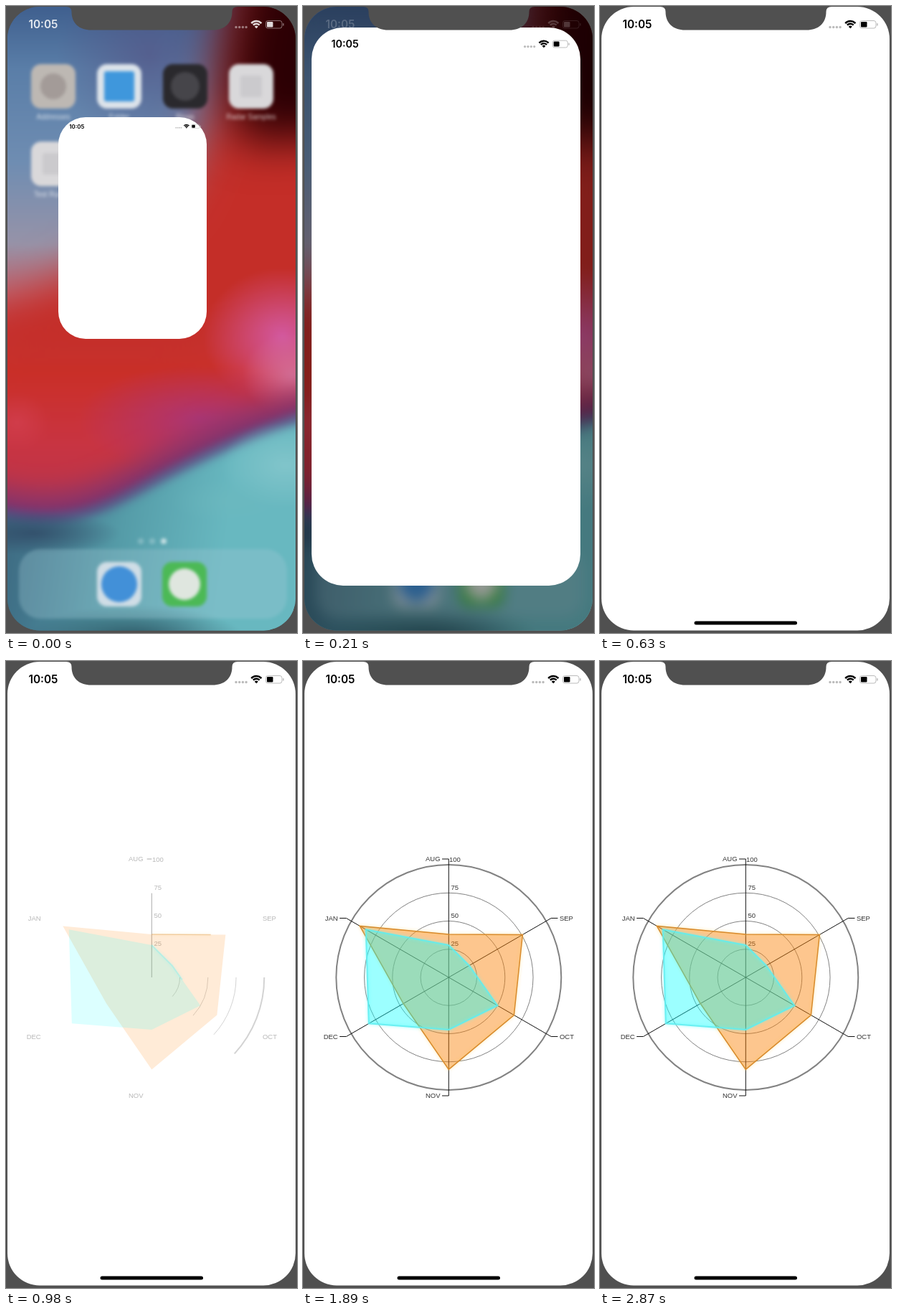
These frames come from a looping animation (406x874 px, 3.08 s). An HTML page with a canvas:

```html
<!DOCTYPE html>
<html lang="en">
<head>
<meta charset="utf-8">
<title>Radar chart launch</title>
<style>
html, body { margin: 0; width: 100%; height: 100%; overflow: hidden; background: #505050; }
canvas { display: block; }
</style>
</head>
<body>
<canvas id="stage" width="406" height="874"></canvas>
<script>
const W = 406, H = 874, LOOP = 3080, STEP = 70;
const CX = 203.3, CY = 441, RING = 157, SPOKE = 165;
const ctx = document.getElementById('stage').getContext('2d');
const clamp = v => Math.max(0, Math.min(1, v));

function box(c, x, y, w, h, r, fill) {
  c.beginPath();
  c.roundRect(x, y, w, h, r);
  if (fill) { c.fillStyle = fill; c.fill(); }
}

function disc(c, x, y, r, fill) {
  c.beginPath();
  c.arc(x, y, r, 0, 7);
  c.fillStyle = fill;
  c.fill();
}

function poly(c, pts) {
  c.beginPath();
  pts.forEach(p => c.lineTo(...p));
  c.closePath();
}

// ---------- home screen, painted once ----------
function ramp(c, x, y, stops) {
  const g = c.createLinearGradient(0, 0, x, y);
  stops.forEach(([at, color]) => g.addColorStop(at, color));
  return g;
}

function softPoly(c, blur, fill, pts) {
  c.filter = `blur(${blur}px)`;
  c.fillStyle = fill;
  poly(c, pts);
  c.fill();
  c.filter = 'none';
}

function blob(c, x, y, rx, ry, rgb, a) {
  c.save();
  c.translate(x, y);
  c.scale(rx, ry);
  const g = c.createRadialGradient(0, 0, 0, 0, 0, 1);
  g.addColorStop(0, `rgba(${rgb},${a})`);
  g.addColorStop(1, `rgba(${rgb},0)`);
  c.fillStyle = g;
  c.fillRect(-1, -1, 2, 2);
  c.restore();
}

function shore(c) {
  c.beginPath();
  c.moveTo(-60, 690);
  c.bezierCurveTo(90, 745, 150, 690, 230, 650);
  c.bezierCurveTo(300, 615, 350, 590, 470, 555);
}

function wallpaper(c) {
  c.fillStyle = ramp(c, 0, H, [[0, '#3f5f8e'], [.1, '#5a7ea8'], [.25, '#6f8db2'], [.38, '#9793a8'],
    [.46, '#bd6470'], [.52, '#c83a40'], [.58, '#cc3028'], [.7, '#c83442'], [1, '#a03860']]);
  c.fillRect(0, 0, W, H);
  blob(c, 200, 70, 130, 130, '85,80,130', .6);
  softPoly(c, 32, '#c42e28', [[325, -60], [480, -60], [480, 440], [250, 500], [-60, 500], [-60, 455],
    [120, 360], [235, 260], [290, 130]]);
  softPoly(c, 32, '#2c0004', [[335, -70], [490, -70], [490, 180], [330, 190], [305, 100]]);
  blob(c, 385, 460, 110, 95, '212,92,170', .9);
  blob(c, 400, 515, 70, 60, '215,130,175', .7);
  blob(c, 270, 575, 170, 75, '165,55,135', .75);
  blob(c, 15, 580, 45, 40, '215,70,90', .5);

  c.filter = 'blur(18px)';
  c.strokeStyle = '#80346f';
  c.lineWidth = 62;
  shore(c);
  c.stroke();

  c.filter = 'blur(7px)';
  shore(c);
  c.lineTo(470, 940);
  c.lineTo(-60, 940);
  c.fillStyle = ramp(c, W, 60, [[0, '#36536e'], [.35, '#41748a'], [.65, '#559ca8'], [1, '#68b8c0']]);
  c.fill();
  c.strokeStyle = 'rgba(75,75,135,.6)';
  c.lineWidth = 14;
  shore(c);
  c.stroke();
  c.filter = 'none';
  blob(c, 390, 640, 90, 60, '135,200,205', .8);
  blob(c, 310, 690, 80, 30, '110,185,190', .45);
  blob(c, 40, 735, 120, 30, '45,65,95', .7);
  blob(c, 180, 880, 150, 45, '35,70,85', .8);
}

function tile(c, x, y, fill, markFill, round, size, label) {
  box(c, x, y, 62, 62, 14, fill);
  if (round) disc(c, x + 31, y + 31, size / 2, markFill);
  else box(c, x + 31 - size / 2, y + 31 - size / 2, size, size, 3, markFill);
  c.fillStyle = 'rgba(255,255,255,.75)';
  c.fillText(label, x + 31, y + 77);
}

function paintHome() {
  const cv = document.createElement('canvas');
  cv.width = W;
  cv.height = H;
  const c = cv.getContext('2d');
  wallpaper(c);
  c.font = '10px "Liberation Sans", sans-serif';
  c.textAlign = 'center';
  tile(c, 35, 81, '#bdb8b3', '#a39b98', true, 36, 'Addresses');
  tile(c, 127, 81, '#dce3ea', '#3f97dc', false, 42, 'Folder');
  tile(c, 219, 81, '#2a292d', '#46454a', true, 40, 'Rings');
  tile(c, 311, 81, '#d9d8da', '#cbcacd', false, 30, 'Radar Samples');
  tile(c, 35, 189, '#d9d8da', '#cbcacd', false, 30, 'Test Runner');
  [188, 204, 220].forEach((x, i) => disc(c, x, 746, 4, `rgba(255,255,255,${i < 2 ? .25 : .65})`));
  box(c, 18, 757, 374, 97, 30, 'rgba(160,200,210,.32)');
  tile(c, 127, 775, '#cfdde6', '#4290d8', true, 50, '');
  tile(c, 218, 775, '#4cb956', '#dfe6df', true, 44, '');
  return cv;
}
const home = paintHome();

// ---------- phone chrome ----------
function statusBar(color, faint) {
  ctx.fillStyle = color;
  ctx.font = '600 15.3px Inter, sans-serif';
  ctx.textAlign = 'left';
  ctx.fillText('10:05', 31.5, 31.3);
  for (let i = 0; i < 4; i++) disc(ctx, 321 + i * 4.7, 29.5, 1.7, faint);
  ctx.strokeStyle = color;
  ctx.lineWidth = 2.5;
  for (const r of [9.7, 6]) {
    ctx.beginPath();
    ctx.arc(349.3, 30.8, r, -Math.PI * .76, -Math.PI * .24);
    ctx.stroke();
  }
  ctx.beginPath();
  ctx.moveTo(349.3, 31.2);
  ctx.arc(349.3, 31.2, 3.6, -Math.PI * .75, -Math.PI * .25);
  ctx.fillStyle = color;
  ctx.fill();
  box(ctx, 362.5, 20.5, 22.5, 10.5, 3);
  ctx.strokeStyle = faint;
  ctx.lineWidth = 1;
  ctx.stroke();
  box(ctx, 364, 22, 8.5, 7.5, 1.2, color);
  box(ctx, 386.2, 24, 1.5, 3.6, .7, faint);
}

function notch() {
  ctx.beginPath();
  ctx.moveTo(84, 0);
  ctx.lineTo(84, 1);
  ctx.quadraticCurveTo(91.5, 1, 91.5, 8);
  ctx.bezierCurveTo(91.5, 24, 102, 33.5, 119, 33.5);
  ctx.lineTo(288, 33.5);
  ctx.bezierCurveTo(305, 33.5, 315.5, 24, 315.5, 8);
  ctx.quadraticCurveTo(315.5, 1, 323, 1);
  ctx.lineTo(323, 0);
  ctx.fillStyle = '#505050';
  ctx.fill();
}

// ---------- launching window ----------
const FROM = [73, 155, 280, 464], FULL = [2, 1, 404, 870], DECAY = [.14, .188, .137, .153];

function launch(t) {
  const left = Math.exp(-t / 110);
  ctx.drawImage(home, 0, 0);
  ctx.filter = `blur(${2.2 + 8 * (1 - left)}px)`;
  ctx.drawImage(home, 0, 0);
  ctx.filter = 'none';
  ctx.fillStyle = `rgba(0,0,0,${.4 * (1 - left)})`;
  ctx.fillRect(0, 0, W, H);
  ctx.globalAlpha = .85 * Math.exp(-t / 150);
  statusBar('#fff', 'rgba(255,255,255,.5)');
  ctx.globalAlpha = 1;

  const [x0, y0, x1, y1] = FULL.map((v, i) => v + (FROM[i] - v) * DECAY[i] ** (t / 210));
  box(ctx, x0, y0, x1 - x0, y1 - y0, 45 - 7 * left, '#fff');
  const s = (x1 - x0) / 402;
  ctx.save();
  ctx.translate(x0, y0);
  ctx.scale(s, s);
  ctx.translate(-FULL[0], -FULL[1]);
  statusBar('#000', '#bbb');
  ctx.restore();
}

// ---------- radar chart ----------
const MONTHS = ['AUG', 'SEP', 'OCT', 'NOV', 'DEC', 'JAN'];
const polar = (i, r) => {
  const a = (i * 60 - 90) * Math.PI / 180;
  return [CX + r * Math.cos(a), CY + r * Math.sin(a)];
};
const series = [
  { values: [38.2, 75.8, 67, 81.8, 46.5, 91.2], fill: 'rgba(250,130,5,.45)', line: '#d88a2c', glow: 'rgba(255,205,90,.7)', width: 1.5 },
  { values: [28.7, 21, 50, 46.5, 82, 85], fill: 'rgba(0,255,255,.39)', line: 'rgba(95,238,240,.85)', glow: 'rgba(90,250,255,.8)', width: 2 }
].map(s => {
  const pts = s.values.map((v, i) => polar(i, v / 100 * RING));
  const length = pts.reduce((sum, p, i) => {
    const q = pts[(i + 1) % 6];
    return sum + Math.hypot(q[0] - p[0], q[1] - p[1]);
  }, 0);
  return { ...s, pts, length };
});

function segment(x0, y0, x1, y1, k) {
  ctx.beginPath();
  ctx.moveTo(x0, y0);
  ctx.lineTo(x0 + (x1 - x0) * k, y0 + (y1 - y0) * k);
  ctx.stroke();
}

function chart(t) {
  const p = 1 - (1 - clamp((t - 884) / 962)) ** 1.2;
  ctx.save();
  ctx.globalAlpha = clamp((t - 910) / 200);

  ctx.strokeStyle = '#828282';
  for (let i = 1; i <= 4; i++) {
    ctx.lineWidth = i < 4 ? 1 : 2;
    ctx.beginPath();
    ctx.arc(CX, CY, RING * i / 4, 0, Math.PI * 2 * p);
    ctx.stroke();
  }

  ctx.font = '9.5px "Liberation Sans", Arial, sans-serif';
  ctx.strokeStyle = '#111';
  ctx.lineWidth = 1;
  MONTHS.forEach((name, i) => {
    const [x, y] = polar(i, SPOKE), k = clamp(p * 6 - i);
    const side = i === 1 || i === 2 ? 1 : -1;
    if (k > 0) {
      segment(CX, CY, x, y, k);
      segment(x, y, x + side * 9.3, y, k);
    }
    ctx.fillStyle = '#333';
    ctx.textAlign = side > 0 ? 'left' : 'right';
    ctx.fillText(name, x + side * 11.7, y + 3.2);
  });
  ctx.textAlign = 'left';
  for (let i = 1; i <= 4; i++) {
    ctx.fillText(i * 25, i < 4 ? 206.5 : 204, CY - RING * i / 4 - 4.4);
  }

  for (const s of series) {
    poly(ctx, s.pts);
    ctx.fillStyle = s.fill;
    ctx.fill();
    ctx.save();
    ctx.setLineDash([s.length * p, s.length]);
    ctx.strokeStyle = s.line;
    ctx.lineWidth = s.width;
    ctx.shadowColor = s.glow;
    ctx.shadowBlur = 4;
    ctx.stroke();
    ctx.restore();
  }
  ctx.restore();
}

// ---------- loop ----------
function draw(t) {
  ctx.fillStyle = '#505050';
  ctx.fillRect(0, 0, W, H);
  ctx.save();
  box(ctx, 2, 1, 402, 869.5, 45);
  ctx.clip();
  if (t < 630) launch(t);
  else {
    ctx.fillStyle = '#fff';
    ctx.fillRect(0, 0, W, H);
    statusBar('#000', '#bbb');
  }
  if (t >= 980) chart(t);
  ctx.globalAlpha = clamp((t - 350) / 210);
  box(ctx, 131.5, 857.5, 143.5, 5, 2.5, '#000');
  ctx.restore();
  notch();
}

function frame(now) {
  draw(Math.floor(now % LOOP / STEP) * STEP);
  requestAnimationFrame(frame);
}
requestAnimationFrame(frame);
</script>
</body>
</html>
```
